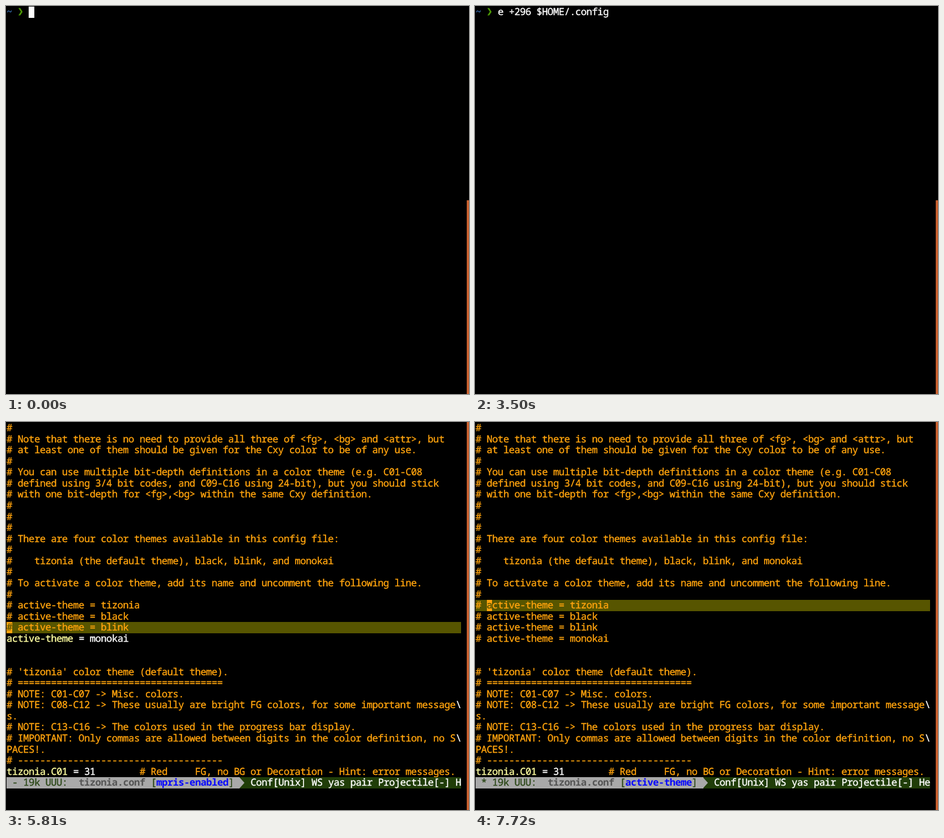
Write an HTML page that moves like this. It is 817x685 px and loops after 7990 ms.

```html
<!DOCTYPE html>
<html lang="en">
<head>
<meta charset="utf-8">
<title>Terminal theme edit</title>
<style>
html, body { margin: 0; width: 100%; height: 100%; overflow: hidden; background: #000; }
#stage {
  --cw: 9.785px; --ch: 19.57px;
  position: relative; width: 817px; height: 685px; overflow: hidden; background: #000;
  font: 500 17.2px/19.57px "Noto Sans Mono", "DejaVu Sans Mono", monospace;
  letter-spacing: calc(var(--cw) - .6em);
  -webkit-text-stroke: .4px;
  font-variant-ligatures: none; text-rendering: geometricPrecision;
}
#stage div { position: absolute; }
.cell {
  left: calc(1px + var(--col) * var(--cw));
  top: calc(1px + var(--row) * var(--ch));
  height: var(--ch); white-space: pre;
}
#grid { left: 0; top: 0; width: 803px; height: 685px; overflow: hidden; }
#bar { right: 0; bottom: 0; width: 4px; background: #c8602f; }
.white { color: #fff; }
.orange { color: #ffa30d; }
.name { color: #ffffa0; }
.path { color: #3465a4; }
.arrow { color: #4e9a06; font-family: "DejaVu Sans Mono", "DejaVu Sans", monospace; }
.line { width: 802px; background: #575500; }
.cursor { width: var(--cw); }
.modeR { width: 802px; background: #203d08; }
.modeL { background: #a9a9a9; color: #2b4717; }
.tip { width: var(--cw); background: #a9a9a9; clip-path: polygon(0 0, 90% 50%, 0 100%); }
.file, .func { font-weight: 700; -webkit-text-stroke: 0; }
.file { color: #555; }
.func { color: #0808ff; }
</style>
</head>
<body>
<div id="stage"><div id="grid"></div><div id="bar"></div></div>
<script>
const LOOP = 7990;
const COMMAND = 'e +296 $HOME/.config/tizonia/tizonia.conf';
const THEME_ROW = 19, MODE_ROW = 32;
const LINES = [
  '#',
  '# Note that there is no need to provide all three of <fg>, <bg> and <attr>, but',
  '# at least one of them should be given for the Cxy color to be of any use.',
  '#',
  '# You can use multiple bit-depth definitions in a color theme (e.g. C01-C08',
  '# defined using 3/4 bit codes, and C09-C16 using 24-bit), but you should stick',
  '# with one bit-depth for <fg>,<bg> within the same Cxy definition.',
  '#',
  '#',
  '#',
  '# There are four color themes available in this config file:',
  '#',
  '#    tizonia (the default theme), black, blink, and monokai',
  '#',
  '# To activate a color theme, add its name and uncomment the following line.',
  '#',
  '# active-theme = tizonia',
  '# active-theme = black',
  '# active-theme = blink',
  'active-theme = monokai',
  '',
  '',
  "# 'tizonia' color theme (default theme).",
  '# ' + '='.repeat(37),
  '# NOTE: C01-C07 -> Misc. colors.',
  '# NOTE: C08-C12 -> These usually are bright FG colors, for some important message',
  's.',
  '# NOTE: C13-C16 -> The colors used in the progress bar display.',
  '# IMPORTANT: Only commas are allowed between digits in the color definition, no S',
  'PACES!.',
  '# ' + '-'.repeat(37),
  'tizonia.C01 = 31        # Red     FG, no BG or Decoration - Hint: error messages.'
];
const WRAPPED = [25, 28];

// Types two characters per step, evenly spread over the given span.
const burst = (start, end, count, typed) => Array.from({ length: count }, (_, i) => [
  start + (end - start) * i / (count - 1),
  { typed: Math.min(typed + 2 * (i + 1), COMMAND.length), on: true }
]);

const STEPS = [
  [0, { view: 'shell', typed: 0, on: true }],
  [90, { on: false }],
  [690, { on: true }],
  [1290, { on: false }],
  [1480, { typed: 1, on: true }],
  [1520, { typed: 2 }],
  [1910, { typed: 4 }],
  [2480, { on: false }],
  ...burst(2540, 2790, 7, 4),
  [2930, { typed: 20 }],
  [3500, { on: false }],
  ...burst(3560, 3970, 11, 20),
  [4490, { view: 'blank', on: true }],
  [4780, { view: 'editor', row: 16, col: 0, prefix: '', func: '???' }],
  [5050, { on: false }],
  [5260, { func: 'mpris-enabled' }],
  [5610, { on: true }],
  [5650, { row: 17 }],
  [5810, { row: 18 }],
  [5970, { row: 19 }],
  [6480, { func: 'active-theme' }],
  [6570, { on: false }],
  [6900, { on: true, prefix: '#', col: 1 }],
  [7130, { prefix: '# ', col: 2 }],
  [7380, { row: 18 }],
  [7530, { row: 17 }],
  [7720, { row: 16 }]
];

const grid = document.getElementById('grid');
const bar = document.getElementById('bar');

function put(row, col, text, kind) {
  const el = document.createElement('div');
  el.className = 'cell ' + kind;
  el.style.setProperty('--row', row);
  el.style.setProperty('--col', col);
  el.textContent = text;
  grid.append(el);
  return el;
}

function cursor(row, col, char = '', back = '#fff') {
  const el = put(row, col, char, 'cursor');
  el.style.background = back;
  el.style.color = '#575500';
}

function drawShell(s) {
  put(0, 0, '~', 'path');
  put(0, 2, '❯', 'arrow');
  put(0, 4, COMMAND.slice(0, s.typed), 'white');
  if (s.on) cursor(0, 4 + s.typed);
}

function drawText(row, text) {
  const setting = text.match(/^([\w.-]+)( = \w+)(.*)$/);
  if (!setting) return put(row, 0, text, 'orange');
  let col = 0;
  ['name', 'white', 'orange'].forEach((kind, i) => {
    put(row, col, setting[i + 1], kind);
    col += setting[i + 1].length;
  });
}

function drawMode(s) {
  const end = 29 + s.func.length;
  put(MODE_ROW, 0, '', 'modeR');
  const left = put(MODE_ROW, 0, '', 'modeL');
  left.style.width = `calc(${end} * var(--cw) + .5px)`;
  put(MODE_ROW, end, '', 'tip');
  put(MODE_ROW, 0, ` ${s.prefix ? '*' : '-'} 19k UUU:`, 'modeL');
  put(MODE_ROW, 13, 'tizonia.conf', 'file');
  put(MODE_ROW, 26, '[', 'modeL');
  put(MODE_ROW, 27, s.func, 'func');
  put(MODE_ROW, end - 2, ']', 'modeL');
  const modes = 'Conf[Unix] WS yas pair Projectile[-] Helm';
  put(MODE_ROW, end + 2, modes.slice(0, 80 - end), 'white');
}

function drawEditor(s) {
  const lines = LINES.slice();
  lines[THEME_ROW] = s.prefix + lines[THEME_ROW];
  put(s.row, 0, '', 'line');
  lines.forEach((text, row) => drawText(row, text));
  WRAPPED.forEach(row => put(row, 81, '\\', 'white'));
  drawMode(s);
  if (s.on) {
    const line = lines[s.row];
    cursor(s.row, s.col, line[s.col], line[0] === '#' ? '#ffa30d' : '#ffffa0');
  }
}

function draw(s) {
  grid.replaceChildren();
  bar.style.height = s.view === 'shell' ? '342px' : '685px';
  if (s.view === 'shell') drawShell(s);
  else if (s.view === 'blank') cursor(1, 0);
  else drawEditor(s);
}

let shown = 0;
function tick() {
  const time = performance.now() % LOOP;
  const past = STEPS.filter(([at]) => at <= time);
  if (past.length !== shown) {
    shown = past.length;
    draw(Object.assign({}, ...past.map(([, change]) => change)));
  }
  requestAnimationFrame(tick);
}
tick();
</script>
</body>
</html>
```
